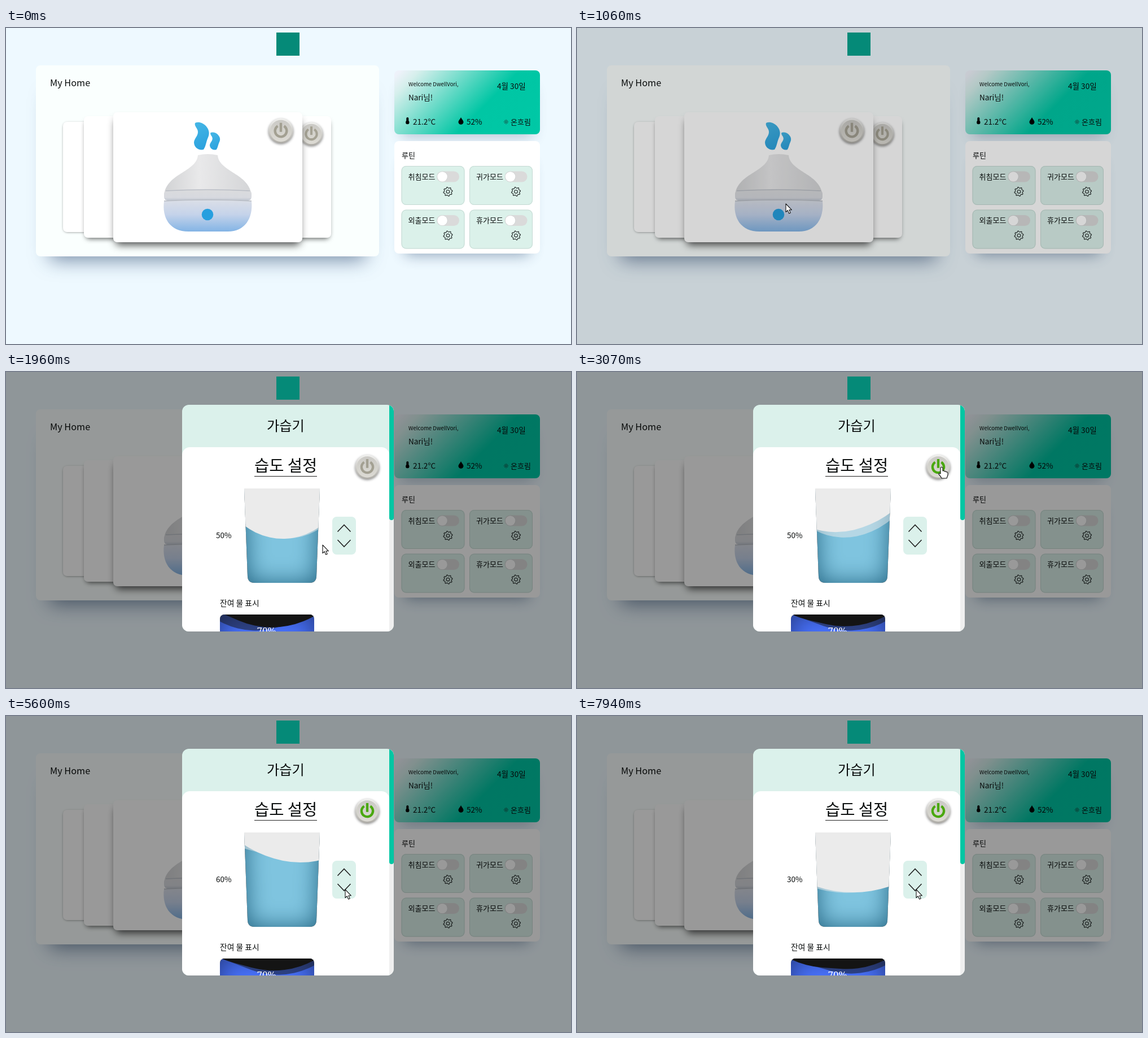
Animation, 1001 px wide and 559 px high, one loop 8000 ms. Source, as an HTML page with a canvas:

```html
<!DOCTYPE html>
<html lang="ko">
<head>
<meta charset="utf-8">
<style>
  html, body { margin: 0; width: 100%; height: 100%; overflow: hidden; background: #eef9ff; }
  canvas { display: block; }
</style>
</head>
<body>
<canvas id="stage" width="1001" height="559"></canvas>
<script>
const W = 1001, H = 559, LOOP = 8000;
const SANS = '"Noto Sans CJK KR", "Noto Sans", sans-serif';
const SERIF = '"Noto Serif", serif';
const stage = document.getElementById('stage').getContext('2d');

function layer() {
  const c = document.createElement('canvas');
  c.width = W;
  c.height = H;
  return c.getContext('2d');
}

const clamp01 = x => Math.min(1, Math.max(0, x));
const ease = x => { x = clamp01(x); return x * x * (3 - 2 * x); };

// Piecewise interpolation through [time, ...values] rows.
function track(keys, t, curve = x => x) {
  const i = keys.findIndex(k => k[0] > t);
  if (i === 0) return keys[0].slice(1);
  if (i < 0) return keys[keys.length - 1].slice(1);
  const a = keys[i - 1], b = keys[i], p = curve((t - a[0]) / (b[0] - a[0]));
  return a.slice(1).map((v, n) => v + (b[n + 1] - v) * p);
}

function rounded(x, y, w, h, r) {
  const p = new Path2D();
  p.roundRect(x, y, w, h, r);
  return p;
}

function gradient(g, x0, y0, x1, y1, ...stops) {
  const grad = g.createLinearGradient(x0, y0, x1, y1);
  stops.forEach(([at, color]) => grad.addColorStop(at, color));
  return grad;
}

function box(g, x, y, w, h, r, fill, shadow) {
  if (shadow) {
    const [dy, blur, inset, color] = shadow;
    g.save();
    g.shadowColor = color;
    g.shadowBlur = blur;
    g.shadowOffsetY = dy;
    g.fillStyle = '#fff';
    g.fill(rounded(x + inset, y + inset, w - 2 * inset, h - 2 * inset, r));
    g.restore();
  }
  g.fillStyle = fill;
  g.fill(rounded(x, y, w, h, r));
}

function text(g, str, x, y, size, weight = 400, color = '#0a0d0d', family = SANS) {
  g.font = `${weight} ${size}px ${family}`;
  g.fillStyle = color;
  g.fillText(str, x, y);
}

function disc(g, x, y, r, fill) {
  g.fillStyle = fill;
  g.beginPath();
  g.arc(x, y, r, 0, 7);
  g.fill();
}

function powerButton(g, x, y, r, color) {
  g.save();
  g.shadowColor = 'rgba(0,0,0,.45)';
  g.shadowBlur = 4;
  g.shadowOffsetY = 1.5;
  disc(g, x, y, r, gradient(g, x, y - r, x, y + r, [0, '#f2f2f0'], [1, '#aeaca6']));
  g.restore();
  disc(g, x, y, r * .87, gradient(g, x, y - r, x, y + r, [0, '#c9c8c4'], [1, '#dedcd5']));
  g.strokeStyle = color;
  g.lineWidth = r * .2;
  g.lineCap = 'butt';
  g.beginPath();
  g.arc(x, y, r * .47, -Math.PI * .32, Math.PI * 1.32);
  g.stroke();
  g.beginPath();
  g.moveTo(x, y - r * .65);
  g.lineTo(x, y + r * .08);
  g.stroke();
}

function gear(g, x, y) {
  g.strokeStyle = '#1c2222';
  g.lineWidth = 1.1;
  g.lineJoin = 'round';
  g.beginPath();
  for (let i = 0; i < 32; i++) {
    const a = (i + .5) * Math.PI / 16, r = i % 4 < 2 ? 8 : 6.3;
    g.lineTo(x + r * Math.sin(a), y + r * Math.cos(a));
  }
  g.closePath();
  g.stroke();
  g.beginPath();
  g.arc(x, y, 2.8, 0, 7);
  g.stroke();
}

function humidifier(g) {
  const steam = new Path2D('M335 168C341 165 349 168 354 173C361 181 361 188 357 196C354 204 354 209 350 215C341 217 333 211 333 202C334 195 340 191 340 184C340 177 333 174 335 168Z');
  g.fillStyle = gradient(g, 335, 165, 360, 217, [0, '#46b7e6'], [1, '#289fdd']);
  g.fill(steam);
  g.save();
  g.translate(361, 184);
  g.scale(.68, .64);
  g.translate(-333, -166);
  g.fill(steam);
  g.restore();

  g.fillStyle = gradient(g, 285, 0, 430, 0, [0, '#d3d4d6'], [.4, '#e9e9ea'], [1, '#d5d6d8']);
  g.fill(new Path2D('M340 225Q357 221 375 225C377 253 426 257 434 290H281C289 257 338 253 340 225Z'));
  box(g, 280, 287, 155, 18, 6, gradient(g, 0, 286, 0, 306, [0, '#dadbdd'], [.7, '#d7d9df'], [1, '#b9c0cc']));
  g.fillStyle = gradient(g, 0, 305, 0, 360, [0, '#dadee7'], [.45, '#c5d3ea'], [1, '#83b4e5']);
  g.fill(new Path2D('M280 306Q357 303 435 306C438 337 423 360 393 360H323C291 360 276 337 280 306Z'));
  g.strokeStyle = '#b9bdc5';
  g.lineWidth = 1.3;
  g.stroke(new Path2D('M283 288Q357 284 432 288M280 306Q357 302 435 306'));
  disc(g, 357, 330, 10.3, '#269fdf');
}

function weatherCard(g) {
  box(g, 688, 75, 258, 113, 8,
    gradient(g, 724, 39, 910, 224, [.03, '#eef2fa'], [.12, '#d6efec'], [.6, '#00c6a4'], [1, '#00c8a6']),
    [18, 24, 12, 'rgba(50,70,110,.28)']);
  text(g, 'Welcome DwellVori,', 713, 103, 9.6);
  text(g, 'Nari님!', 713, 128, 13.5);
  text(g, '4월 30일', 870, 108, 13.6);
  text(g, '21.2°C', 721, 170.5, 13.6);
  text(g, '52%', 816, 170.5, 13.6);
  text(g, '온흐림', 894, 170.5, 13);
  g.fillStyle = '#000';
  g.fill(rounded(709.3, 158, 4, 10, 2));
  disc(g, 711.3, 167, 3.2, '#000');
  g.fill(new Path2D('M806 158C808 162 810.5 164 810.5 166.5A4.5 4.2 0 0 1 801.5 166.5C801.5 164 804 162 806 158Z'));
  g.strokeStyle = '#222';
  g.lineWidth = .8;
  g.beginPath();
  g.arc(886, 166, 1.8, 0, 7);
  for (let i = 0; i < 8; i++) {
    const c = Math.cos(i * Math.PI / 4), s = Math.sin(i * Math.PI / 4);
    g.moveTo(886 + 2.9 * c, 166 + 2.9 * s);
    g.lineTo(886 + 4.2 * c, 166 + 4.2 * s);
  }
  g.stroke();
}

function routineTile(g, label, x, y) {
  box(g, x, y, 112, 69, 8, '#dbf1ea');
  g.strokeStyle = '#c5d9d3';
  g.lineWidth = 1;
  g.stroke(rounded(x + .5, y + .5, 111, 68, 8));
  text(g, label, x + 12, y + 23.5, 13, 500);
  box(g, x + 62.5, y + 9.5, 40, 19, 9.5, '#dadada');
  disc(g, x + 72.5, y + 19, 9.5, '#cfd3d3');
  disc(g, x + 72.5, y + 19, 8.8, '#fff');
  gear(g, x + 82.5, y + 45.5);
}

function paintHome(g) {
  g.fillStyle = '#eef9ff';
  g.fillRect(0, 0, W, H);
  box(g, 53, 66, 608, 338, 8, '#fafffe', [30, 34, 24, 'rgba(40,70,110,.62)']);
  text(g, 'My Home', 78, 103, 16.3, 500);

  const cardShadow = [5, 9, 3, 'rgba(0,0,0,.6)'];
  box(g, 101, 166, 430, 195, 7, '#fff', [1, 4, 1, 'rgba(0,0,0,.5)']);
  box(g, 138, 156, 438, 215, 7, '#fff', cardShadow);
  powerButton(g, 541, 187.5, 20.5, '#a5a294');
  box(g, 190, 149, 335, 230, 7, '#fff', [9, 14, 4, 'rgba(0,0,0,.68)']);
  powerButton(g, 487, 182, 22, '#a3a092');
  humidifier(g);

  weatherCard(g);
  box(g, 688, 200, 258, 199, 8, '#fff', [20, 26, 18, 'rgba(40,70,110,.5)']);
  text(g, '루틴', 701, 230, 13, 500);
  routineTile(g, '취침모드', 700.5, 244);
  routineTile(g, '귀가모드', 821, 244);
  routineTile(g, '외출모드', 700.5, 321.5);
  routineTile(g, '휴가모드', 821, 321.5);
}

function insetShadow(g, shape, blur, color) {
  const frame = new Path2D();
  frame.rect(-100, -100, W + 200, H + 200);
  frame.addPath(shape);
  g.save();
  g.shadowColor = color;
  g.shadowBlur = blur;
  g.fillStyle = '#000';
  g.fill(frame, 'evenodd');
  g.restore();
}

function spun(g, x, y, degrees, shape, fill) {
  g.save();
  g.translate(x, y);
  g.rotate(degrees * Math.PI / 180);
  g.fillStyle = fill;
  g.fill(shape);
  g.restore();
}

function tank(g, shape, color, blur, shade, air) {
  g.save();
  g.clip(shape);
  g.fillStyle = color;
  g.fill(shape);
  insetShadow(g, shape, blur, shade);
  air();
  g.restore();
}

const glassShape = new Path2D('M422 206H556L550 362Q549 373 538 373H440Q429 373 428 362Z');
const gaugeShape = rounded(379, 429, 167, 167, 8);
const oval = new Path2D();
oval.ellipse(0, 0, 134, 167, 0, 0, 7);
const blob = percent => rounded(-167, -167, 334, 334, 334 * percent / 100);
const blobFront = blob(45), blobBack = blob(40);

const glassFront = [[0, -72], [6710, 169], [7940, 270], [8000, 274]];
const glassBack = [[0, -50], [3070, 16], [4500, 48], [6710, 130], [7940, 262], [8000, 266]];
const airCentre = { 30: 178, 40: 152, 50: 128, 60: 111 };

function levelAt(t) {
  if (t < 3900) return 50;
  if (t < 6320) return 60;
  if (t < 7130) return 50;
  return t < 7810 ? 40 : 30;
}

function chevron(g, y, dy) {
  g.beginPath();
  g.moveTo(587.5, y);
  g.lineTo(599, y + dy);
  g.lineTo(610.5, y);
  g.stroke();
}

function paintModal(g, t) {
  const level = levelAt(t);
  g.clearRect(0, 0, W, H);
  g.save();
  g.clip(rounded(312, 58, 375, 401, 12));
  g.fillStyle = '#dbf1eb';
  g.fillRect(312, 58, 375, 401);
  g.fillStyle = '#fff';
  g.fill(rounded(312, 133, 367, 360, 14));
  g.fillStyle = '#efefef';
  g.fillRect(679, 58, 8, 401);
  box(g, 679, 58, 8, 204, [0, 0, 4, 4], '#00c6a3');

  text(g, '가습기', 462, 104, 24.2);
  text(g, '습도 설정', 440, 176, 28.5);
  g.fillStyle = '#222';
  g.fillRect(440, 184, 111, 1);
  powerButton(g, 640, 168, 21.5, t < 2600 ? '#a3a092' : '#4aa80f');

  text(g, level + '%', 372, 294, 13.6);
  tank(g, glassShape, '#7fc4df', 42, 'rgba(0,62,92,.7)', () => {
    const y = airCentre[level];
    spun(g, 489, y, track(glassFront, t)[0], oval, '#ebebeb');
    spun(g, 489, y, track(glassBack, t)[0], oval, 'rgba(235,235,235,.5)');
  });

  box(g, 578, 256, 42, 67, 8, '#dbf1eb');
  g.strokeStyle = '#222';
  g.lineWidth = 1.6;
  g.lineJoin = 'miter';
  chevron(g, 282.5, -12);
  chevron(g, 297, 12);

  text(g, '잔여 물 표시', 379, 414, 13.8, 500);
  tank(g, gaugeShape, '#4973ff', 46, 'rgba(0,0,0,.5)', () => {
    spun(g, 462.5, 279.5, 5 + (t - 6710) * .072, blobFront, '#141414');
    spun(g, 462.5, 281, 20 + (t - 3070) * .036, blobBack, 'rgba(20,20,20,.5)');
  });
  text(g, '70%', 444.5, 463.5, 17, 500, '#fff', SERIF);
  g.restore();
}

const arrow = new Path2D('M0 0V14.5L3.3 11.6L5.6 17L8.2 15.9L5.9 10.7H10.3Z');
const hand = new Path2D('M-2 1.5Q0-1 2 1.5V7Q4 5.5 5 8Q7 6.5 8 9Q10.5 8 11 11V14Q10 17 9 20H0Q-1 17-5 13Q-6 10-2 12Z');
const cursorPath = [
  [380, 430, 570], [820, 370, 311], [1400, 370, 311], [1900, 561, 306], [2080, 561, 306],
  [2480, 646, 168], [3200, 646, 168], [3580, 609, 277], [4250, 609, 277], [4430, 606, 277],
  [5020, 606, 277], [5290, 601, 307]
];

function paintCursor(g, t) {
  if (t < 380) return;
  const [x, y] = track(cursorPath, t, ease);
  const shape = x > 618 && y < 190 ? hand : arrow;
  g.save();
  g.translate(x, y);
  g.lineJoin = 'round';
  g.lineWidth = 1.1;
  g.strokeStyle = '#111';
  g.fillStyle = '#fff';
  g.fill(shape);
  g.stroke(shape);
  g.restore();
}

const home = layer(), modal = layer();
paintHome(home);

function render(t) {
  stage.drawImage(home.canvas, 0, 0);
  stage.fillStyle = `rgba(0,0,0,${.4 * ease((t - 930) / 300)})`;
  stage.fillRect(0, 0, W, H);
  stage.fillStyle = '#058a78';
  stage.fillRect(479, 8, 41, 41);

  const shown = clamp01((t - 1200) / 180);
  if (shown) {
    paintModal(modal, t);
    stage.globalAlpha = shown;
    stage.drawImage(modal.canvas, 0, -30 * (1 - ease((t - 1200) / 300)));
    stage.globalAlpha = 1;
  }
  paintCursor(stage, t);
}

const start = performance.now();
function tick() {
  render((performance.now() - start) % LOOP);
  requestAnimationFrame(tick);
}
tick();
</script>
</body>
</html>
```
